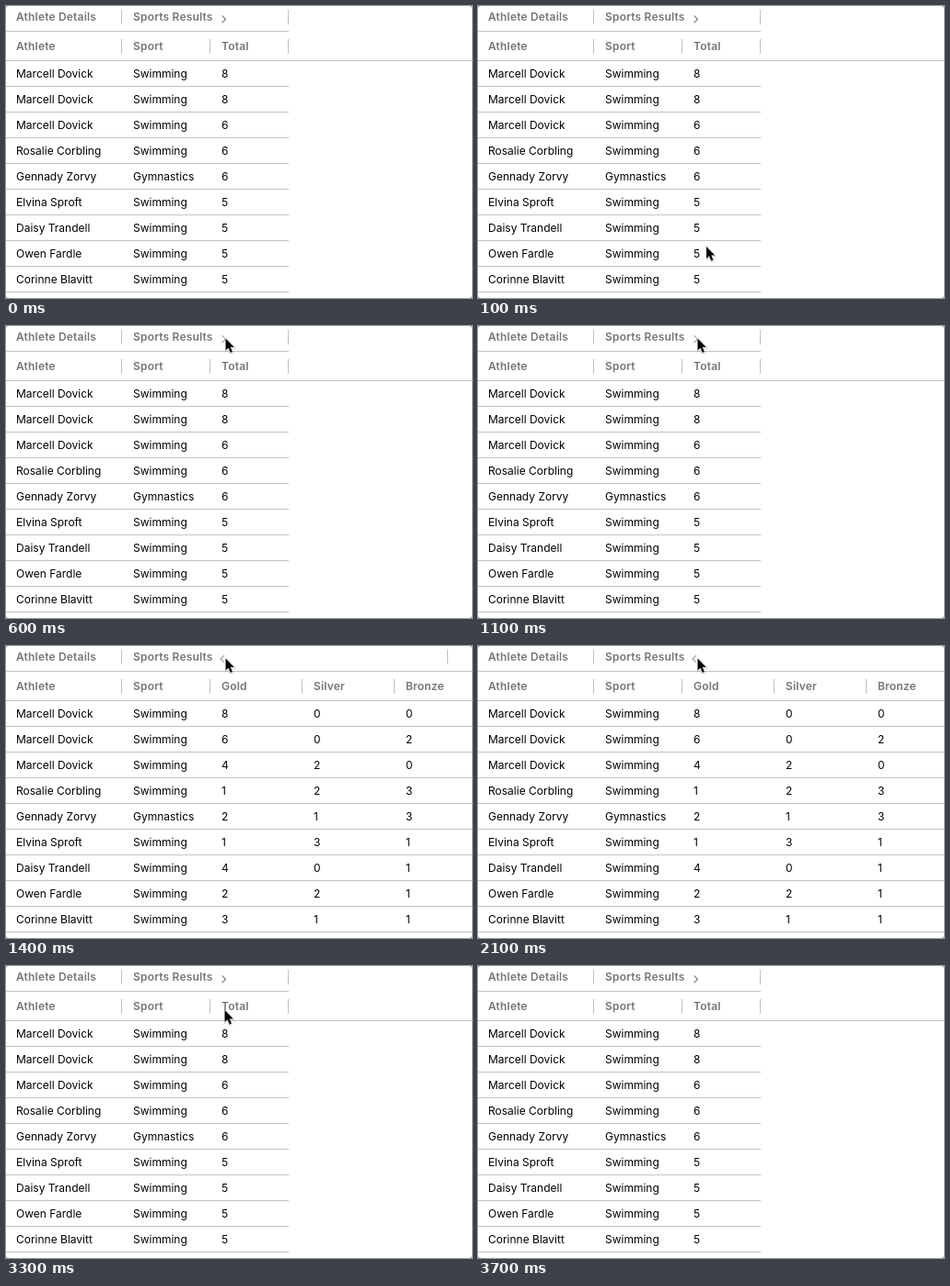
Recreate the animation shown at these times as an HTML page. Size 506x318 px, loop 3900 ms.

```html
<!DOCTYPE html>
<html lang="en">
<head>
<meta charset="utf-8">
<title>Expanding column group</title>
<style>
  html, body { margin: 0; width: 100%; height: 100%; overflow: hidden; background: #fff; }
  svg { display: block; width: 100%; height: 100%; }
  text { font: 400 12px Inter, "Open Sans", sans-serif; fill: #000; white-space: pre; }
  .head { font-weight: 600; fill: #757575; letter-spacing: .18px; }
  .rule { fill: #bdc3c7; shape-rendering: crispEdges; }
</style>
</head>
<body>
<svg id="stage" viewBox="0 0 506 318">
  <rect width="506" height="318" fill="#8c8c8c"/>
  <rect width="506" height="318" rx="3" fill="#fff"/>
  <g id="fixed"></g>
  <g id="closed"></g>
  <g id="opened"></g>
  <rect id="edge" class="rule" y="4" width="1" height="16"/>
  <path id="chevron" fill="none" stroke-width="1.2"/>
  <g id="cursor">
    <path d="M0 0V13L3 10.3L5.2 15.4L7.4 14.5L5.2 9.5H9.2Z" transform="translate(.3 .8)"
          fill="none" stroke="#000" stroke-opacity=".15" stroke-width="2"/>
    <path d="M0 0V13L3 10.3L5.2 15.4L7.4 14.5L5.2 9.5H9.2Z"
          fill="#000" stroke="#fff" stroke-width="1" paint-order="stroke"/>
  </g>
</svg>
<script>
const LOOP = 3900, STEP = 100;
const OPEN_AT = 1400, CLOSE_AT = 2500;
const NARROW = 306, WIDE = 522, ROW = 28;

// name, gold, silver, bronze
const rows = [
  ["Marcell Dovick", 8, 0, 0],
  ["Marcell Dovick", 6, 0, 2],
  ["Marcell Dovick", 4, 2, 0],
  ["Rosalie Corbling", 1, 2, 3],
  ["Gennady Zorvy", 2, 1, 3],
  ["Elvina Sproft", 1, 3, 1],
  ["Daisy Trandell", 4, 0, 1],
  ["Owen Fardle", 2, 2, 1],
  ["Corinne Blavitt", 3, 1, 1]
];

// time, x, y of the pointer tip
const enter = [[100, 248, 262], [200, 247, 172], [300, 244, 92], [400, 240.5, 40], [500, 239, 21], [600, 238.5, 13.5]];
const leave = [[3300, 237.5, 48], [3400, 239, 108], [3500, 241, 188], [3600, 244, 272]];
const path = [...enter, ...leave];

const $ = id => document.getElementById(id);

function add(parent, tag, attrs, content = "") {
  const el = document.createElementNS("http://www.w3.org/2000/svg", tag);
  for (const key in attrs) el.setAttribute(key, attrs[key]);
  el.textContent = content;
  parent.append(el);
}

const label = (g, x, y, s, cls = "") => add(g, "text", { x, y, class: cls }, s);
const rule = (g, x, y, width, height) => add(g, "rect", { x, y, width, height, class: "rule" });

function column(g, x, title, value) {
  label(g, x, 48, title, "head");
  rows.forEach((row, i) => label(g, x, 78 + ROW * i, value(row, i)));
}

function rowLines(g, width) {
  rule(g, 0, 27, width, 1);
  rows.forEach((_, i) => rule(g, 0, 87 + ROW * i, width, 1));
}

function build() {
  const fixed = $("fixed"), closed = $("closed"), opened = $("opened");
  label(fixed, 11, 16, "Athlete Details", "head");
  label(fixed, 138, 16, "Sports Results", "head");
  column(fixed, 11, "Athlete", row => row[0]);
  column(fixed, 138, "Sport", (row, i) => i === 4 ? "Gymnastics" : "Swimming");
  rule(fixed, 0, 59, 506, 1);
  rule(fixed, 125, 4, 1, 16);
  rule(fixed, 125, 36, 1, 16);
  rule(fixed, 221, 36, 1, 16);

  rowLines(closed, 307);
  column(closed, 234, "Total", row => row[1] + row[2] + row[3]);
  rule(closed, NARROW, 36, 1, 16);

  rowLines(opened, 506);
  ["Gold", "Silver", "Bronze"].forEach((title, i) => {
    column(opened, 234 + 100 * i, title, row => row[i + 1]);
    if (i) rule(opened, 221 + 100 * i, 36, 1, 16);
  });
}

// The group header's right edge covers 80% of the remaining way per step.
function edgeX(t) {
  const ease = since => 1 - 0.2 ** ((t - since) / STEP + 1);
  if (t < OPEN_AT) return NARROW;
  const x = t < CLOSE_AT
    ? NARROW + (WIDE - NARROW) * ease(OPEN_AT)
    : WIDE + (NARROW - WIDE) * ease(CLOSE_AT);
  return Math.round(x);
}

function draw(time) {
  const t = Math.floor((time % LOOP) / STEP) * STEP;
  const open = t >= OPEN_AT && t < CLOSE_AT;
  const hover = t >= 600 && t < 3300;

  $("opened").style.display = open ? "" : "none";
  $("closed").style.display = open ? "none" : "";
  $("edge").setAttribute("x", edgeX(t));

  $("chevron").setAttribute("d", open ? "M237 10L233 14L237 18" : "M234.5 10.4L238.5 14.4L234.5 18.4");
  $("chevron").setAttribute("stroke", hover ? "#a8a8a8" : "#757575");

  const visible = t >= 100 && t < 3700;
  $("cursor").style.display = visible ? "" : "none";
  if (visible) {
    const [, x, y] = path.findLast(p => p[0] <= t);
    $("cursor").setAttribute("transform", `translate(${x} ${y})`);
  }
}

build();
const start = performance.now();
function tick() {
  draw(performance.now() - start);
  requestAnimationFrame(tick);
}
tick();
</script>
</body>
</html>
```
